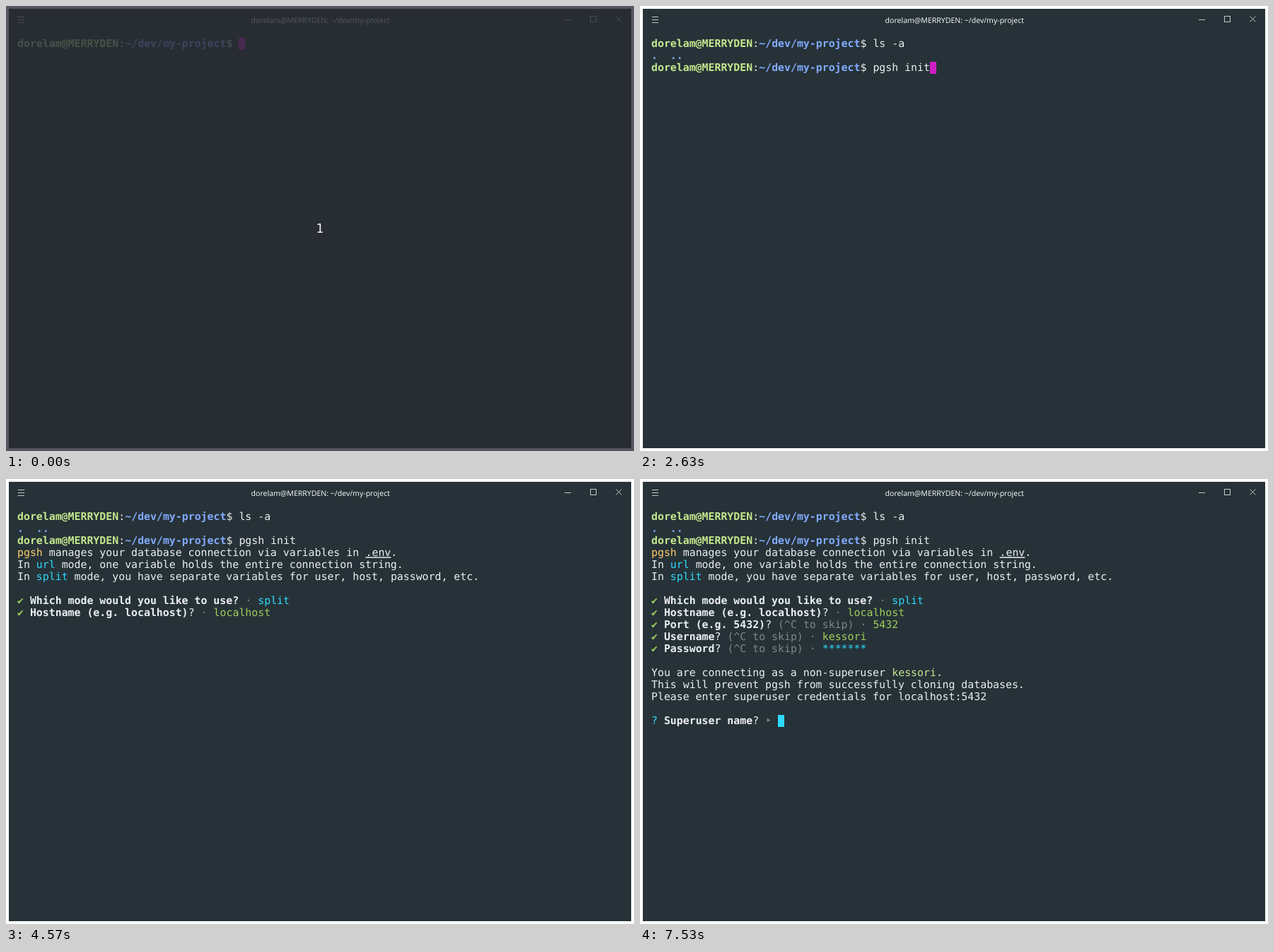
An HTML page for the animation above (8 s loop, 888 by 630 pixels).

```html
<!DOCTYPE html>
<html lang="en">
<head>
<meta charset="utf-8">
<title>Terminal session</title>
<style>
  html, body { margin: 0; width: 100%; height: 100%; overflow: hidden; background: #fff; }
  svg { display: block; width: 888px; height: 630px; }
  text { white-space: pre; text-rendering: geometricPrecision; }
  #screen { font: 14.874px "DejaVu Sans Mono", monospace; fill: #eceff1; }
  #screen .bold { font-weight: bold; }
  #screen .user { font-weight: bold; fill: #c3e88d; }
  #screen .path { font-weight: bold; fill: #82aaff; }
  #screen .lime { fill: #c3e88d; }
  #screen .green { fill: #9ece58; }
  #screen .cyan { fill: #2ddafd; }
  #screen .yellow { fill: #ffcb6b; }
  #screen .muted { fill: #808688; }
  #screen .link { text-decoration: underline; }
  #screen .focus { fill: #2ddafd; text-decoration: underline; }
  #screen .inverse { fill: #263238; }
  .caret-bg { fill: #d01ec4; }
  .inverse-bg { fill: #2ddafd; }
  #title { font: 10.57px "Open Sans", "Noto Sans", sans-serif; fill: #fff; text-anchor: middle; }
  #icons { fill: none; stroke: #c3c8ca; stroke-width: 1; }
  #count { font: 18px "DejaVu Sans Mono", monospace; fill: #eceff1; text-anchor: middle; }
</style>
</head>
<body>
<svg viewBox="0 0 888 630">
  <rect width="888" height="630" fill="#fff"/>
  <rect x="4" y="4" width="880" height="622" fill="#263238"/>
  <text id="title" x="444.8" y="24"></text>
  <g id="icons">
    <path d="M17 15.5h9M17 19.5h9M17 23.5h9M790 19.5h9"/>
    <rect x="826.5" y="14.5" width="8" height="8"/>
    <path d="M862.5 14.5l8 8M870.5 14.5l-8 8"/>
  </g>
  <g id="screen"></g>
  <g id="countdown">
    <rect width="888" height="630" fill="#282c34" opacity=".8"/>
    <text id="count" x="443.6" y="321">1</text>
  </g>
</svg>
<script>
const LOOP = 8000, LEFT = 16, TOP = 45, CELL = 8.955, ROW = 17, BASELINE = 13.3;
const HOST = "dorelam@MERRYDEN", DIR = "~/dev/my-project", LOGIN = "kessori";
const SKIP = "(^C to skip) ";
const $ = id => document.getElementById(id);

// A line is a list of [style, text] runs.
const caret = ["caret", " "], block = ["inverse", " "];
const plain = text => [["", text]];
const shell = (command, ...rest) =>
  [["user", HOST], ["", ":"], ["path", DIR], ["", "$ " + command], ...rest];
const ask = (name, hint, ...rest) =>
  [["cyan", "? "], ["bold", name], ["", "? "], ["muted", hint + "‣ "], ...rest];
const answered = (name, hint, style, value) =>
  [["green", "✔ "], ["bold", name], ["", "? "], ["muted", hint + "· "], [style, value]];
const suggest = value => [["inverse", value[0]], ["muted", value.slice(1)]];

const listing = [shell("ls -a"), [["path", ".  .."]]];
const intro = [
  ...listing,
  shell("pgsh init"),
  [["yellow", "pgsh"], ["", " manages your database connection via variables in "], ["link", ".env"], ["", "."]],
  [["", "In "], ["cyan", "url"], ["", " mode, one variable holds the entire connection string."]],
  [["", "In "], ["cyan", "split"], ["", " mode, you have separate variables for user, host, password, etc."]],
  []
];

const modeText = "Which mode would you like to use?";
const chooseMode = selected => [
  ...intro,
  [["cyan", "? "], ["bold", modeText + " "], ["muted", "‣"]],
  ...["url", "split"].map(mode => mode === selected
    ? [["cyan", "▸ "], ["focus", mode]]
    : plain("  " + mode))
];
const modeDone = [...intro,
  [["green", "✔ "], ["bold", modeText + " "], ["muted", "· "], ["cyan", "split"]]];

const hostText = "Hostname (e.g. localhost)", portText = "Port (e.g. 5432)";
const hostDone = [...modeDone, answered(hostText, "", "green", "localhost")];
const portDone = [...hostDone, answered(portText, SKIP, "green", "5432")];
const userDone = [...portDone, answered("Username", SKIP, "green", LOGIN)];
const finished = [
  ...userDone,
  answered("Password", SKIP, "cyan", "*".repeat(7)),
  [],
  [["", "You are connecting as a non-superuser "], ["lime", LOGIN], ["", "."]],
  plain("This will prevent pgsh from successfully cloning databases."),
  plain("Please enter superuser credentials for localhost:5432"),
  [],
  ask("Superuser name", "", block)
];

const first = command => [shell(command, caret)];
const second = command => [...listing, shell(command, caret)];
const username = length => [...portDone, ask("Username", SKIP, ["", LOGIN.slice(0, length)], block)];
const password = length => [...userDone, ask("Password", SKIP, ["muted", "*".repeat(length)], caret)];

const steps = [
  [0, first("")],
  [270, first("l")],
  [470, first("ls ")],
  [570, first("ls -a")],
  [670, second("")],
  [1730, second("pg")],
  [2170, second("pgsh")],
  [2400, second("pgsh i")],
  [2530, second("pgsh ini")],
  [2630, second("pgsh init")],
  [2970, [...listing, shell("pgsh init"), [caret]]],
  [3100, intro],
  [3530, chooseMode("url")],
  [4000, chooseMode("split")],
  [4130, [...modeDone, ask(hostText, "", ...suggest("localhost"))]],
  [4570, hostDone],
  [5000, [...hostDone, ask(portText, SKIP, ...suggest("5432"))]],
  [5430, username(1)],
  [5570, username(2)],
  [5870, username(4)],
  [6000, username(7)],
  [6170, password(0)],
  [6430, password(2)],
  [6600, password(3)],
  [6830, password(5)],
  [6970, password(6)],
  [7400, password(7)],
  [7530, finished]
];

function lineMarkup(runs, row) {
  const y = TOP + row * ROW;
  let column = 0, markup = "";
  for (const [style, text] of runs) {
    const x = LEFT + column * CELL;
    column += text.length;
    if (style === "caret" || style === "inverse") {
      const left = Math.round(x), right = Math.round(LEFT + column * CELL);
      markup += `<rect class="${style}-bg" x="${left}" y="${y}" width="${right - left}" height="${ROW}"/>`;
    }
    if (text.trim()) markup += `<text class="${style}" x="${x}" y="${y + BASELINE}">${text}</text>`;
  }
  return markup;
}

let shown;
function render(time) {
  const step = steps.findLast(([start]) => start <= time);
  if (step === shown) return;
  shown = step;
  $("screen").innerHTML = step[1].map(lineMarkup).join("");
  $("countdown").style.display = step === steps[0] ? "" : "none";
}

$("title").textContent = `${HOST}: ${DIR}`;
const began = performance.now();
function tick() {
  render((performance.now() - began) % LOOP);
  requestAnimationFrame(tick);
}
tick();
</script>
</body>
</html>
```
